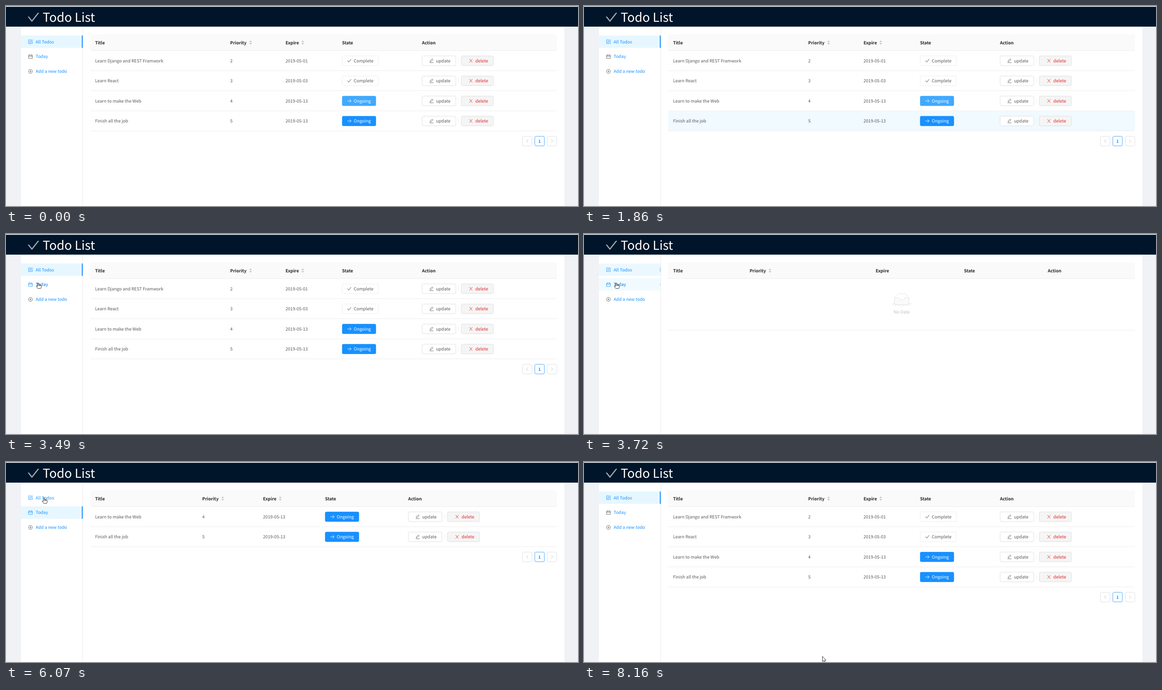
Write an HTML page that moves like this. It is 1263 by 443 pixels and loops after 8700 ms.

```html
<!DOCTYPE html>
<html lang="en">
<head>
<meta charset="utf-8">
<title>Todo List</title>
<style>
  html, body { margin: 0; width: 100%; height: 100%; overflow: hidden; background: #f0f2f5; }
  svg { display: block; width: 1263px; height: 443px; }
  text {
    font: 9.585px "Noto Sans CJK SC", "Noto Sans CJK JP", "Noto Sans CJK TC", "Noto Sans CJK KR", sans-serif;
    text-rendering: geometricPrecision;
  }
  .head { font-weight: 700; }
  .logo { font-size: 27.4px; }
</style>
</head>
<body>
<svg id="stage" viewBox="0 0 1263 443"></svg>
<script>
const LOOP = 8700;
const BLUE = '#1890ff', GREY = '#595959', RED = '#e5262d', LINE = '#e8e8e8', BORDER = '#d9d9d9', PALE = '#e6f7ff';

// Icons are centred on 0,0.
const ICONS = {
  form: 'M.8-4H-4.1V4.1H4.1V-.6M-1.5 1.6L-1.2-.4 3.4-4.6 4.7-3.3.5 1.2Z',
  calendar: 'M-4.2-3.1H4.2V4.1H-4.2ZM-4.2-.5H4.2M-2-4.4V-2M2-4.4V-2',
  plus: 'M4.4 0A4.4 4.4 0 1 1-4.4 0A4.4 4.4 0 1 1 4.4 0ZM-2.2 0H2.2M0-2.2V2.2',
  edit: 'M-4.4 4.2H4.4M-3.2 2L-2.8-.1 1.6-4.2 3.4-2.5-1 1.6Z',
  close: 'M-3.2-3.8L3.2 3.8M3.2-3.8L-3.2 3.8',
  arrow: 'M-4.2 0H4M.4-3.8L4.2 0 .4 3.8',
  left: 'M2-3.3L-2 0 2 3.3',
  right: 'M-2-3.3L2 0-2 3.3'
};
const CHECK = 'M912 190h-70q-16 0-25 12L405 724 207 474q-9-12-25-12h-70q-12 0-6 13l274 347q25 24 50 0l488-619q4-13-6-13z';
const ARROW = 'M0 0V11.5L2.6 9.2 4.4 13.2 6.3 12.4 4.6 8.5H8Z';
const HAND = 'M-1.2 1Q0-.8 1.2 1V4.4L5.6 5Q7 5.3 7 6.6V9Q7 11 5.8 12.6H-.8Q-2.4 10.6-4 8.2-4.2 6.6-2.8 7L-1.2 8.3Z';
const KNUCKLES = 'M1.2 4.4V7M3.2 4.8V7M5.1 5.1V7';

const VIEWS = {
  all: { cols: [196.7, 495, 617.2, 742, 918.5], rows: [
    ['Learn Django and REST Framwork', 2, '2019-05-01', true],
    ['Learn React', 3, '2019-05-03', true],
    ['Learn to make the Web', 4, '2019-05-13'],
    ['Finish all the job', 5, '2019-05-13']] },
  today: { cols: [196.7, 433.3, 567.5, 704.5, 888], rows: [
    ['Learn to make the Web', 4, '2019-05-13'],
    ['Finish all the job', 5, '2019-05-13']] },
  empty: { cols: [196.7, 365.7, 644, 839, 1024], rows: [] }
};
const MENU = [['All Todos', 'form', 40], ['Today', 'calendar', 28], ['Add a new todo', 'plus', 71]];

// Pointer path: time, x, y
const PATH = [
  [379, 1300, 500], [380, 1168, 415], [760, 1147, 382], [1150, 1146, 384], [1230, 1045, 383], [1310, 1000, 376],
  [1390, 911, 352], [1470, 828, 335], [1550, 738, 304], [1700, 600, 277], [1860, 520, 245], [1950, 400, 176],
  [2030, 330, 160], [2300, 190, 150], [2500, 150, 143], [2640, 125, 136], [2710, 110.5, 123.5], [2880, 85, 112],
  [3120, 71, 108], [5199, 71, 108], [5200, 79.5, 97], [5400, 86, 80], [5610, 88, 77], [5980, 88, 77],
  [6070, 84, 79], [7459, 84, 79], [7460, 88, 100], [7620, 105, 140], [7760, 148, 230], [7880, 212, 355],
  [8000, 325, 415], [8160, 526.5, 430.5]
];

const ramp = (t, a, b) => Math.min(1, Math.max(0, (t - a) / (b - a)));

function pointerAt(t) {
  const i = PATH.findIndex(k => k[0] > t);
  if (i === 0) return PATH[0].slice(1);
  if (i < 0) return PATH[PATH.length - 1].slice(1);
  const [t0, x0, y0] = PATH[i - 1], [t1, x1, y1] = PATH[i], p = ramp(t, t0, t1);
  return [x0 + (x1 - x0) * p, y0 + (y1 - y0) * p];
}

// Share of the last 300 ms the pointer spent in a box: a linear hover fade.
function hover(t, x, y, w, h) {
  let inside = 0;
  for (let k = 0; k < 15; k++) {
    const [px, py] = pointerAt(t - k * 20);
    if (px >= x && px < x + w && py >= y && py < y + h) inside++;
  }
  return inside / 15;
}

const rect = (x, y, w, h, fill, extra = '') =>
  `<rect x="${x}" y="${y}" width="${w}" height="${h}" fill="${fill}" ${extra}/>`;
const text = (x, y, value, fill, extra = '') =>
  `<text x="${x}" y="${y + 3.5}" fill="${fill}" ${extra}>${value}</text>`;
const path = (d, x, y, attrs) => `<path d="${d}" transform="translate(${x} ${y})" ${attrs}/>`;
const icon = (name, x, y, color, opacity = 1) =>
  path(ICONS[name], x, y, `fill="none" stroke="${color}" stroke-width=".85" opacity="${opacity}"`);
const check = (x, y, k, color) =>
  `<path d="${CHECK}" transform="translate(${x} ${y}) scale(${k}) translate(-512 -512)" fill="${color}"/>`;
const box = (x, y, w, fill, border, extra = '') =>
  rect(x + .35, y - 10.6, w - .7, 21.3, fill, `rx="2.7" stroke="${border}" stroke-width=".8" ${extra}`);
const sorter = x => path('M-3-1.2L0-4.6 3-1.2ZM-3 1.2L0 4.6 3 1.2Z', x, 81, 'fill="#bfbfbf"');

function stateButton(x, y, done, color) {
  return done
    ? box(x, y, 80.5, '#fff', BORDER, 'stroke-dasharray="2 1.4"') + check(x + 16, y, .0106, GREY) + text(x + 25.8, y, 'Complete', GREY)
    : box(x, y, 75, color, color) + icon('arrow', x + 16, y, '#fff') + text(x + 25.8, y, 'Ongoing', '#fff');
}

function actions(x, y) {
  return box(x, y, 75, '#fff', BORDER) + icon('edit', x + 21, y, GREY) + text(x + 31, y, 'update', GREY) +
    rect(x + 80.7, y - 5, .7, 10.5, LINE) +
    box(x + 86.5, y, 71.5, '#f5f5f5', BORDER) + icon('close', x + 108, y, RED) + text(x + 118, y, 'delete', RED);
}

function pagination(y) {
  return box(1140, y, 21.7, '#fff', BORDER) + icon('left', 1150.8, y, '#bfbfbf') +
    box(1167.3, y, 21.7, '#fff', BLUE) + text(1178.1, y, '1', BLUE, 'text-anchor="middle" class="head"') +
    box(1194.8, y, 21.7, '#fff', BORDER) + icon('right', 1205.7, y, '#bfbfbf');
}

function noData() {
  return `<g transform="translate(679.6 132.2) scale(.685)" stroke="${BORDER}">
    <ellipse cx="32" cy="33" rx="32" ry="7" fill="#f5f5f5" stroke="none"/>
    <path d="M55 12.8L44.9 1.3Q44 0 42.9 0H21.1Q20 0 19.1 1.3L9 12.8V22H55Z" fill="#fff"/>
    <path d="M41.6 15.9Q41.6 13 43.8 13H55V31Q55 35 52 35H12Q9 35 9 31V13H20.2Q22.4 13 22.4 16T24.6 18.9H39.4Q41.6 18.9 41.6 15.9Z" fill="#fafafa"/>
  </g>` + text(701.5, 172.8, 'No Data', '#bfbfbf', 'text-anchor="middle"') + rect(186, 212.5, 1030.5, .8, LINE);
}

function table(t) {
  const name = t < 3600 ? 'all' : t < 3860 ? 'empty' : t < 6300 ? 'today' : t < 6380 ? 'empty' : 'all';
  const { cols, rows } = VIEWS[name];
  let out = rect(186, 62.5, 1030.5, 36, '#fafafa', 'rx="2"') + rect(186, 98.3, 1030.5, .8, LINE);
  ['Title', 'Priority', 'Expire', 'State', 'Action'].forEach((label, i) =>
    out += text(cols[i], 81, label, '#262626', 'class="head"'));
  out += sorter(cols[1] + 45.1);
  if (name === 'all' || t > 6000) out += sorter(cols[2] + 38);
  rows.forEach(([title, priority, date, done], i) => {
    const top = 99 + i * 44.5, y = top + 22.2;
    const focused = t < 3490 && i === 2;
    out += rect(186, top, 1030.5, 44, PALE, `opacity="${hover(t, 186, top, 1030.5, 44.5)}"`) +
      rect(186, top + 43.8, 1030.5, .8, LINE) +
      text(cols[0], y, title, GREY) + text(cols[1], y, priority, GREY) + text(cols[2], y, date, GREY) +
      stateButton(cols[3], y, done, focused ? '#40a9ff' : BLUE) + actions(cols[4], y);
  });
  return out + (rows.length ? pagination(121.2 + rows.length * 44.5) : noData());
}

function menu(t) {
  const fills = [1 - ramp(t, 3660, 3960) + ramp(t, 6220, 6500), ramp(t, 3560, 3860) - ramp(t, 6250, 6500), 0];
  const bars = [1 - ramp(t, 3620, 3770) + ramp(t, 6350, 6520), ramp(t, 3690, 3870) - ramp(t, 6280, 6430), 0];
  let out = rect(169, 46, .8, 397, LINE);
  MENU.forEach(([label, glyph, width], i) => {
    const y = 79 + i * 32.9, pressed = i === 1 && t >= 3490 && t < 3800;
    const lit = Math.max(fills[i], hover(t, 33, y - 13.7, 136, 27.4));
    out += rect(33, y - 13.7, 136, 27.4, PALE, `opacity="${fills[i]}"`) +
      rect(167.4, y - 13.7 * bars[i], 2.1, 27.4 * bars[i], BLUE, `opacity="${bars[i]}"`) +
      icon(glyph, 54, y, GREY, 1 - lit) + icon(glyph, 54, y, BLUE, lit) +
      text(65.5, y, label, pressed ? '#096dd9' : BLUE);
    if (!pressed) out += text(65.5, y, label, '#69bcff', `opacity="${hover(t, 65, y - 7, width, 14)}"`);
  });
  return out;
}

function pointer(t) {
  if (t < 380 || (t >= 1860 && t < 1950)) return '';
  const [x, y] = pointerAt(t), ink = 'stroke="#222" stroke-width=".9" stroke-linejoin="round"';
  return t >= 2760 && t < 7500
    ? path(HAND, x, y, `fill="#fff" ${ink}`) + path(KNUCKLES, x, y, `fill="none" ${ink}`)
    : path(ARROW, x, y, `fill="#fff" ${ink}`);
}

const frame = rect(0, 0, 1263, 443, '#f0f2f5') + rect(33, 45, 1200, 398, '#fff') +
  rect(0, 1.7, 1263, 44, '#001529') + check(60.5, 25, .0307, '#a6adb4') +
  text(81, 31.8, 'Todo List', '#fff', 'class="logo"');
const stage = document.getElementById('stage');

function draw() {
  const t = performance.now() % LOOP;
  stage.innerHTML = frame + menu(t) + table(t) + pointer(t);
  requestAnimationFrame(draw);
}
draw();
</script>
</body>
</html>
```
